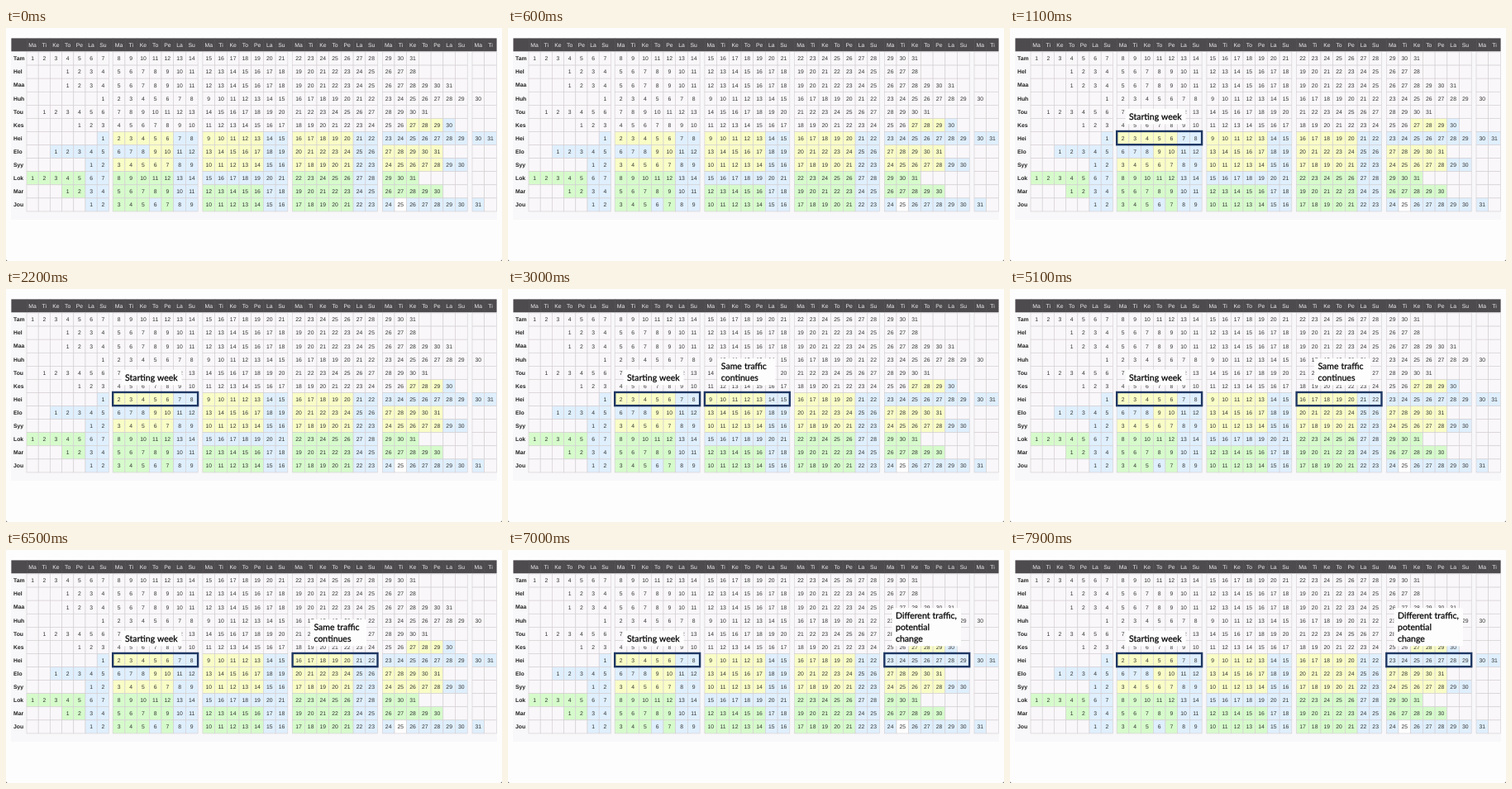
Write an HTML page that moves like this. It is 600x282 px and loops after 8 s.

```html
<!DOCTYPE html>
<html lang="en">
<head>
<meta charset="utf-8">
<title>Calendar weeks</title>
<style>
html, body { margin: 0; width: 100%; height: 100%; overflow: hidden; background: #333; }
svg { display: block; width: 600px; height: 282px; background: #fefdfe; border-radius: 0 0 2px 2px; text-rendering: geometricPrecision; }
.cal { font: 6.8px "Liberation Sans", Arial, sans-serif; fill: #333; }
.mid { text-anchor: middle; }
.head { fill: #eee; }
.month { font-weight: bold; fill: #222; }
.note { font: 10.5px Lato, Carlito, sans-serif; fill: #000; word-spacing: .4px; stroke: #000; stroke-width: .25px; }
</style>
</head>
<body>
<svg id="stage" viewBox="0 0 600 282"></svg>
<script>
const stage = document.getElementById('stage');
const DAYS = ['Ma', 'Ti', 'Ke', 'To', 'Pe', 'La', 'Su'];
const MONTHS = ['Tam', 'Hel', 'Maa', 'Huh', 'Tou', 'Kes', 'Hei', 'Elo', 'Syy', 'Lok', 'Mar', 'Jou'];
const PLAIN = '#f9f7f9', BLUE = '#dfeffd', YELLOW = '#f9fdc6', GREEN = '#d6fbcb';
const TOP = 29, ROW = 16.08, COLS = 37;

function add(parent, tag, attrs, text) {
  const el = document.createElementNS('http://www.w3.org/2000/svg', tag);
  for (const key in attrs) el.setAttribute(key, attrs[key]);
  if (text !== undefined) el.textContent = text;
  parent.append(el);
  return el;
}
const rect = (parent, x, y, width, height, fill, more) =>
  add(parent, 'rect', { x, y, width, height, fill, ...more });
const label = (parent, x, y, text, cls) => add(parent, 'text', { x, y, class: cls }, text);

// The first week is slightly narrower than the others.
const weekX = week => week ? 129.2 + (week - 1) * 108.7 : 25;
const dayW = week => week ? 14.7 : 14.2;
const cellX = col => weekX(Math.floor(col / 7)) + col % 7 * dayW(Math.floor(col / 7));

function cellColor(month, day, weekday) {
  const date = (month + 1) * 100 + day;
  if (date < 627) return PLAIN;
  if (date === 1225) return '#fefefe';
  const holiday = date >= 723 && date <= 808 || date >= 1015 && date <= 1021 ||
    date === 1206 || date >= 1224;
  if (holiday || weekday > 4) return BLUE;
  return date < 1001 ? YELLOW : GREEN;
}

function drawCalendar() {
  const cal = add(stage, 'g', { class: 'cal' });
  rect(cal, 6, 12, 588, 220, '#f8f7f9');
  rect(cal, 6.4, 12.4, 587.2, 15.9, '#4e4b4e');
  for (let col = 0; col < COLS; col++) {
    const w = dayW(Math.floor(col / 7));
    rect(cal, cellX(col), 12.4, .5, 15.9, '#5b585b');
    label(cal, cellX(col) + w / 2, 22.7, DAYS[col % 7], 'mid head');
  }
  MONTHS.forEach((name, month) => {
    const y = TOP + month * ROW;
    const first = (new Date(2018, month, 1).getDay() + 6) % 7;
    const length = new Date(2018, month + 1, 0).getDate();
    label(cal, 9, y + 10.3, name, 'month');
    for (let col = 0; col < COLS; col++) {
      const day = col - first + 1, valid = day > 0 && day <= length;
      const x = cellX(col), w = dayW(Math.floor(col / 7));
      rect(cal, x, y, w, ROW, valid ? cellColor(month, day, col % 7) : PLAIN,
        { stroke: '#d2ced1', 'stroke-width': .6 });
      if (valid) label(cal, x + w / 2, y + 10.4, day, 'mid');
    }
  });
}

// A framed week in the July row with a caption box above it.
function mark(week, x, width, lines) {
  const group = add(stage, 'g', {});
  const height = lines.length * 13.8 + 4.7;
  rect(group, x, 116.3 - height, width, height, '#fefdfe');
  lines.forEach((line, i) =>
    label(group, x + 4.5, 110.8 - (lines.length - 1 - i) * 13.8, line, 'note'));
  rect(group, weekX(week), TOP + 6 * ROW - .5, 102.9, 16.2, 'none',
    { stroke: '#1f3763', 'stroke-width': 2.4 });
  return group;
}

drawCalendar();
const same = ['Same traffic', 'continues'];
const marks = [
  { from: 900, to: 8000, el: mark(1, 139.6, 73, ['Starting week']) },
  { from: 2900, to: 4900, el: mark(2, 253.3, 70, same) },
  { from: 4900, to: 6900, el: mark(3, 368, 68, same) },
  { from: 6900, to: 8000, el: mark(4, 464.5, 83.5, ['Different traffic,', 'potential', 'change']) }
];

function frame() {
  const t = performance.now() % 8000;
  for (const { from, to, el } of marks)
    el.setAttribute('visibility', t >= from && t < to ? 'visible' : 'hidden');
  requestAnimationFrame(frame);
}
frame();
</script>
</body>
</html>
```
